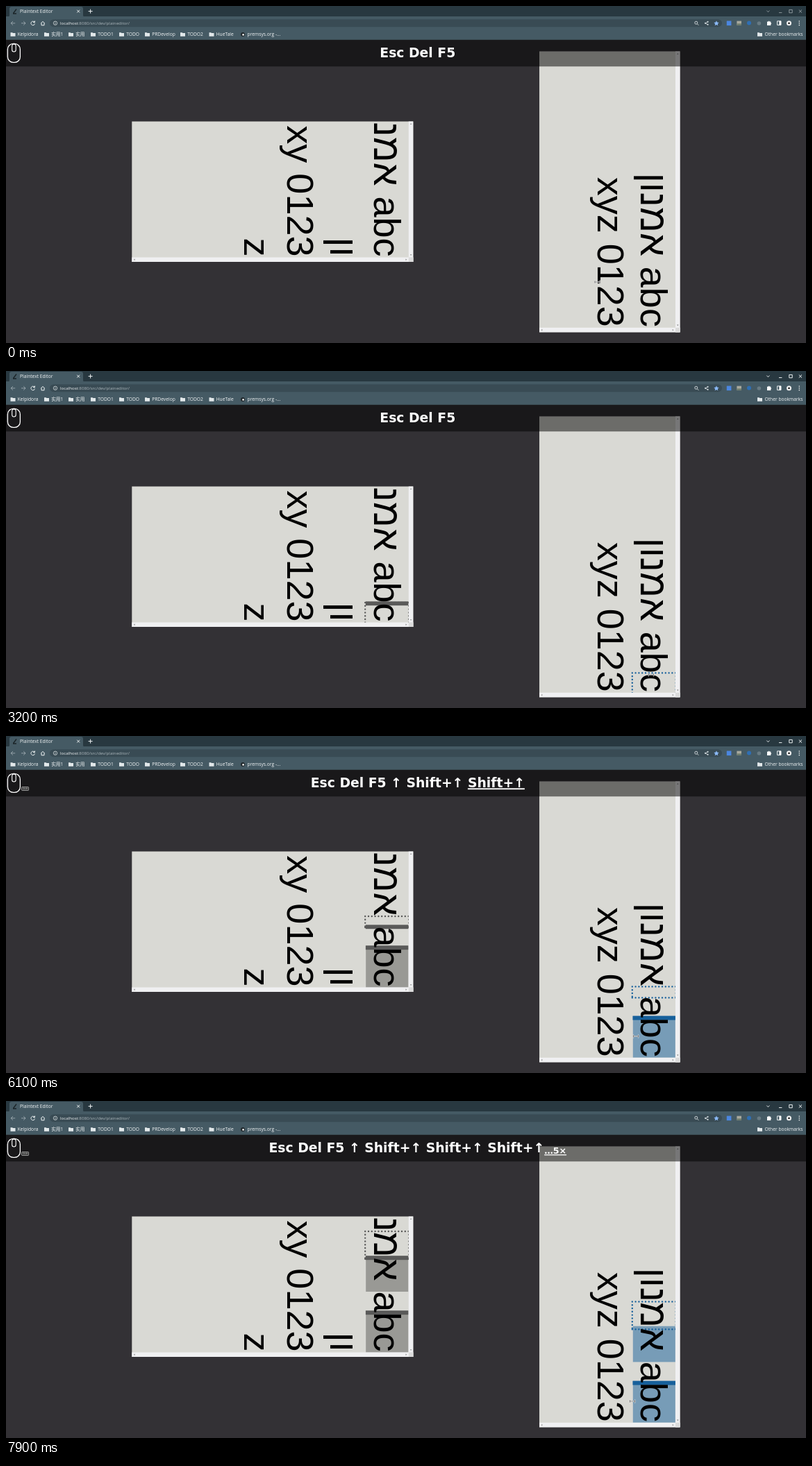
An HTML page for the animation above (8 s loop, 1152 by 486 pixels).

```html
<!DOCTYPE html>
<html lang="en">
<head>
<meta charset="utf-8">
<title>Plaintext Editor</title>
<style>
  html, body { margin: 0; width: 100%; height: 100%; overflow: hidden; background: #333135; }
  svg { display: block; width: 100%; height: 100%; }
  text { white-space: pre; }
  .ui { font: 6.7px "Open Sans", "Noto Sans CJK SC", "Noto Sans CJK JP", "Noto Sans CJK", sans-serif; fill: #f1f4f5; }
  .url { font-size: 6.15px; fill: #aab5ba; }
  .big { font: 54px "Liberation Sans", Arial, sans-serif; text-anchor: end; fill: #000; }
  .keys { font: bold 18.8px "DejaVu Sans", sans-serif; text-anchor: middle; fill: #fff; }
  .line { fill: none; stroke: #eef2f3; stroke-width: 1; }
  .dots { fill: none; stroke-width: 2.4; stroke-linecap: round; stroke-dasharray: 0 4.8; }
</style>
</head>
<body>
<svg id="stage" viewBox="0 0 1152 486">
  <defs>
    <clipPath id="wide"><rect x="181" y="166.5" width="398.8" height="196"/></clipPath>
    <clipPath id="tall"><rect x="383.4" y="-36" width="196" height="398.3"/></clipPath>
  </defs>
  <rect width="1152" height="486" fill="#333135"/>
  <g id="browser"></g>
  <g id="panels"></g>
  <rect y="48.8" width="1152" height="38.4" fill="#000" opacity=".5"/>
  <g id="overlay">
    <path id="click" d="M11 55.5C6 55.5 4 59 4 64v3h7z" fill="#fff" opacity="0"/>
    <rect class="line" x="2.4" y="54.4" width="18" height="27" rx="8" style="stroke:#fff;stroke-width:1.3"/>
    <rect class="line" x="8.7" y="55" width="5.5" height="11" rx="2.7" style="stroke:#fff;stroke-width:1.1"/>
    <g id="mod">
      <rect x="22.6" y="73.5" width="10" height="5" rx=".8" fill="#333" stroke="#ccc" stroke-width=".7"/>
      <text x="27.6" y="77.3" font-family="DejaVu Sans, sans-serif" font-size="3.2" fill="#ddd" text-anchor="middle">Shift</text>
    </g>
    <text id="keys" class="keys" x="592.8" y="74.3"></text>
  </g>
  <g id="cursor" fill="none" stroke-linecap="round">
    <path d="M-3.6 -1.8v3.6M3.6 -1.8v3.6M-3.6 0h7.2" stroke="#fff" stroke-width="1.5"/>
    <path d="M-3.6 -1.6v3.2M3.6 -1.6v3.2M-3.6 0h7.2" stroke="#555" stroke-width=".7"/>
  </g>
</svg>
<script>
const LOOP = 8000;
const $ = id => document.getElementById(id);
const rect = (x, y, w, h, fill, more = '') =>
  `<rect x="${x}" y="${y}" width="${w}" height="${h}" fill="${fill}" ${more}/>`;
const line = (d, more = '') => `<path class="line" d="${d}" ${more}/>`;
const label = (x, y, s, cls = '', more = '') => `<text class="ui ${cls}" x="${x}" y="${y}" ${more}>${s}</text>`;
const disc = (x, y, r, fill) => `<circle cx="${x}" cy="${y}" r="${r}" fill="${fill}"/>`;

function browser() {
  const folder = x => `<path d="M${x} 38.2h2.6l.9 .9h3.5v4.6h-7z" fill="#e2e8ea"/>`;
  const marks = [[6.5, 'Kelpidora'], [55, '实用1'], [90, '实用'], [122, 'TODO1'], [163, 'TODO'],
    [200, 'PRDevelop'], [251, 'TODO2'], [292.5, 'HueTale']];
  return rect(0, 0, 1152, 16, '#283840') + rect(0, 15, 1152, 33.8, '#455a64') +
    '<path d="M2 16q3 0 3-3V4q0-3 3-3h100q3 0 3 3v9q0 3 3 3z" fill="#455a64"/>' +
    line('M10.5 10.5l4.5-6M10 11h5', 'style="stroke:#1b2428;stroke-width:1.3"') +
    label(20, 10, 'Plaintext Editor') +
    line('M102.3 5.7l3.8 3.8m0-3.8l-3.8 3.8M118.6 7.6h6m-3-3v6') +
    `<g id="buttons">${line('M1095.4 6.6l2 2 2-2M1113 9.6h4.4M1127.8 5.4h4.4v4.4h-4.4zM1141.8 5.5l4.2 4.2m0-4.2l-4.2 4.2')}</g>` +
    line('M13.2 24.8H7.2m2.8-2.8l-2.8 2.8 2.8 2.8M22 24.8h6m-2.8-2.8l2.8 2.8-2.8 2.8', 'opacity=".45"') +
    line('M41 23.2a2.8 2.8 0 1 0 .5 2.3M41.4 21.4v2.3h-2.3M50.2 25l2.8-2.6 2.8 2.6M51 24.6v3.2h4v-3.2') +
    rect(63, 19.2, 968, 11, '#394b54', 'rx="5.5"') +
    '<circle class="line" cx="71" cy="24.7" r="2.7" style="stroke-width:.7"/>' + line('M71 24.3v2M71 22.9v.6', 'style="stroke-width:.7"') +
    label(78, 26.9, '<tspan fill="#f1f4f5">localhost</tspan>:8080/src/dev/plaineditor/', 'url') +
    '<circle class="line" cx="993.8" cy="24.2" r="2" style="stroke-width:.8"/>' +
    line('M995.4 25.8l2 2M1007 24.8l3.6-2M1007 24.8l3.6 2', 'style="stroke-width:.8"') +
    disc(1007, 24.8, 1, '#dde4e7') + disc(1010.6, 22.8, 1, '#dde4e7') + disc(1010.6, 26.8, 1, '#dde4e7') +
    '<path d="M1023 21.2l1.1 2.4 2.6.3-1.9 1.8.5 2.6-2.3-1.3-2.3 1.3.5-2.6-1.9-1.8 2.6-.3z" fill="#8ab8f5"/>' +
    rect(1037.8, 21.5, 6.6, 6.6, '#4b86e0') +
    rect(1052.4, 21.6, 6.6, 6.2, '#a9a99d') + rect(1052.4, 25.4, 6.6, 2.4, '#6d7b6b') +
    disc(1070, 24.4, 3, '#2f6fb4') + disc(1084.4, 25, 2.8, '#687a83') +
    '<path d="M1096 22.4h1.8q.8-2 1.7 0h1.8v1.8q2 .8 0 1.7v2.2H1096z" fill="#fff"/>' +
    line('M1110.6 21.8h5.4v5.6h-5.4z') + rect(1113.4, 21.8, 2.6, 5.6, '#fff') +
    disc(1127.5, 24.8, 3.5, '#f2f2f2') + disc(1127.5, 24.8, 1.4, '#222') +
    [22, 24.8, 27.6].map(y => disc(1142.3, y, .8, '#fff')).join('') +
    marks.map(([x, s]) => folder(x) + label(x + 10.2, 43, s)).join('') +
    disc(341, 41, 3, '#20282c') + disc(341.6, 41.4, 1.4, '#eee') + label(347.6, 43, 'premsys.org -…') +
    folder(1082) + label(1092.5, 43, 'Other bookmarks');
}

function frame(x, y, w, h) {
  const r = x + w, b = y + h, bar = '#f0f0f2';
  const tri = (cx, cy, a) => `<path d="M-1.3 .8h2.6L0-1z" transform="translate(${cx} ${cy}) rotate(${a})" fill="#8a8a8a"/>`;
  return rect(x, y, w, h, '#d9d9d4') + rect(r - 6.5, y, 6.5, h, bar) + rect(x, b - 6.5, w, 6.5, bar) +
    rect(r - 6.5, b - 6.5, 6.5, 6.5, '#dcdcdc') +
    tri(r - 3.2, y + 3.5, 0) + tri(r - 3.2, b - 10, 180) + tri(x + 3.5, b - 3.2, -90) + tri(r - 10, b - 3.2, 90);
}

// Lines run downwards; each next one sits one line height to the left.
const lines = list => list.map((s, i) => s &&
  `<text class="big" transform="translate(${529.5 - i * 62.1} 361.5) rotate(90)">${s}</text>`).join('');

$('browser').innerHTML = browser();
$('panels').innerHTML = frame(181.3, 166.5, 405, 202.5) +
  `<g clip-path="url(#wide)"><g id="grey"></g>${lines(['אמנ abc', 'ון', 'xy 0123', 'z'])}</g>` +
  frame(768, 65.4, 202.5, 405) +
  `<g transform="translate(384.6 101.4)" clip-path="url(#tall)"><g id="blue"></g>${lines(['אמנון abc', 'xyz 0123'])}</g>`;

// Top and bottom of each character box
const BOX = { c: [334, 365], b: [304, 336.7], a: [274, 306.7], sp: [260, 276], alef: [225, 261.5], mem: [188, 227.8] };
const S = 'Shift+↑', BASE = 'Esc Del F5';
// time, focused box, caret box, top of the upper selection (0: none, 275: empty), keys, pressed key
const STEPS = [
  [0, '', '', 0, BASE, ''],
  [1700, 'c', 'c', 0, BASE, ''],
  [3900, 'b', 'b', 0, BASE + ' ', '↑'],
  [4800, 'b', 'b', 0, BASE + ' ↑', ''],
  [5700, 'a', 'b', 275, BASE + ' ↑ ', S],
  [6000, 'sp', 'a', 275, `${BASE} ↑ ${S} `, S],
  [6600, 'alef', 'sp', 258.3, `${BASE} ↑ ${S} ${S} `, S],
  [7400, 'mem', 'alef', 223.3, `${BASE} ↑ ${S} ${S} ${S}`, '…5×']
];
// Spans in which the blinking caret shows
const BLINK = [[1700, 2200], [2700, 3200], [3700, 4400], [4900, 5400], [5700, 6000], [6300, 7100], [7400, 7900]];
const PATH = [[0, 851.5, 398], [900, 928, 433], [1000, 928, 432], [1700, 928, 432], [2200, 929, 438], [3900, 929, 438],
  [4100, 918, 432], [5400, 911, 433], [6100, 907, 433], [6700, 905, 431], [7900, 902, 433]];

function marks([, focus, caret, top], color, lit) {
  if (!focus) return '';
  const bar = y => rect(517.9, y - 1.7, 61.4, 5.9, color);
  const [y, b] = BOX[focus];
  let out = '';
  if (top) {
    out += rect(518.2, 302.3, 61, 60.2, color, 'opacity=".5"') +
      rect(518.2, top, 61, 275 - top, color, 'opacity=".5"') + bar(BOX.b[0]);
  }
  out += `<path class="dots" stroke="${color}" d="M517.2 ${y}H580.2M517.2 ${y}V${b}M517.2 ${b}H580.2M580.2 ${y}V${b}"/>`;
  return out + (lit ? bar(BOX[caret][0]) : '');
}

function place(t) {
  const i = PATH.findIndex(p => p[0] > t);
  if (i < 0) return PATH[PATH.length - 1].slice(1);
  const [t0, x0, y0] = PATH[i - 1], [t1, x1, y1] = PATH[i], k = (t - t0) / (t1 - t0);
  return [x0 + (x1 - x0) * k, y0 + (y1 - y0) * k];
}

let shown = '';
function draw(t) {
  const step = STEPS.filter(s => s[0] <= t).pop();
  const lit = BLINK.some(([a, b]) => t >= a && t < b);
  $('cursor').setAttribute('transform', `translate(${place(t)})`);
  $('click').setAttribute('opacity', t >= 1700 && t < 2600 ? .3 : 0);
  $('buttons').setAttribute('opacity', t < 1700 ? .5 : 1);
  $('mod').setAttribute('visibility', t >= 4800 ? 'visible' : 'hidden');
  const now = step[0] + '/' + lit;
  if (now === shown) return;
  shown = now;
  $('grey').innerHTML = marks(step, '#5a5a59', true);
  $('blue').innerHTML = marks(step, '#17609b', lit);
  const count = step[5][0] === '…' ? 'font-size="12.6" dy="2.2"' : '';
  $('keys').setAttribute('y', count ? 73.9 : 74.3);
  $('keys').innerHTML = step[4] + (step[5] && `<tspan ${count} text-decoration="underline">${step[5]}</tspan>`);
}

const start = performance.now();
function tick() {
  draw((performance.now() - start) % LOOP);
  requestAnimationFrame(tick);
}
tick();
</script>
</body>
</html>
```
